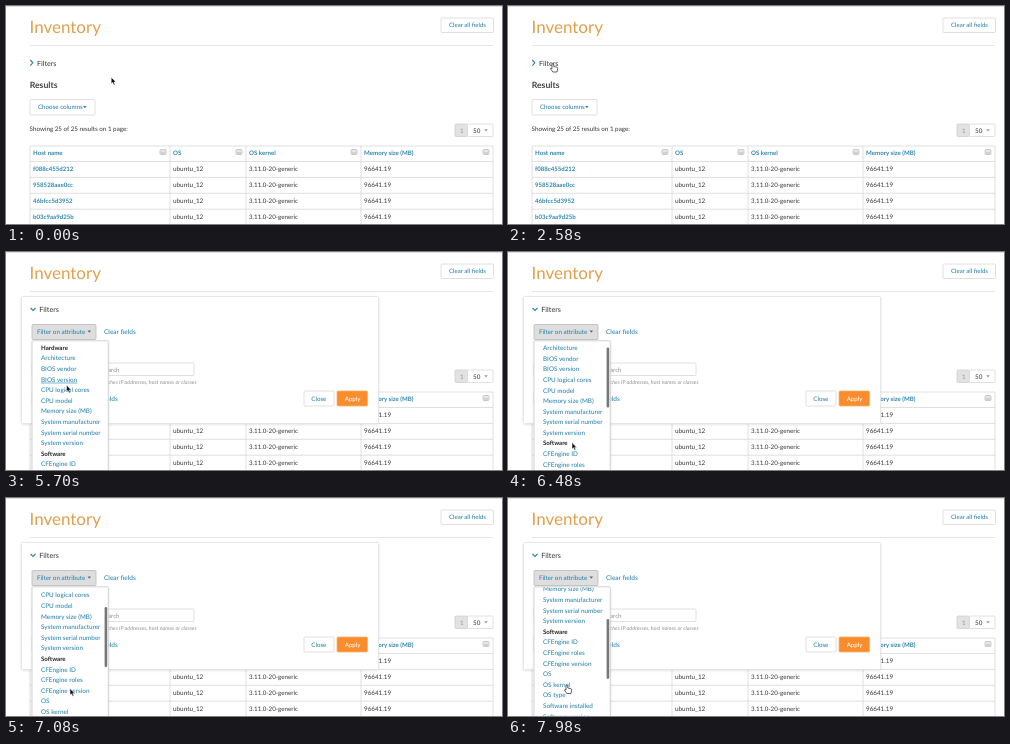
Recreate the animation shown at these times as an HTML page. Size 496 px wide and 218 px high, loop 8 s.

```html
<!DOCTYPE html>
<html lang="en">
<head>
<meta charset="utf-8">
<title>Inventory</title>
<style>
html, body { margin: 0; width: 496px; height: 218px; overflow: hidden; background: #fff; }
svg { display: block; }
text { font-family: Lato, "Open Sans", sans-serif; font-weight: 500; text-rendering: geometricPrecision; }
</style>
</head>
<body>
<svg id="stage" width="496" height="218" viewBox="0 0 496 218"></svg>
<script>
const BLUE = '#2e86ae', DARK = '#444', GREY = '#999', LINE = '#d8d8d8';
const LOOP = 8000, OPEN = 2600, HOVER = 4380, DROP = 4920, SCROLL = 6270;

// y is the middle of the capitals
const text = (x, y, s, fill = DARK, size = 6.2, extra = '') =>
  `<text x="${x}" y="${y + size * .36}" font-size="${size}" fill="${fill}" ${extra}>${s}</text>`;
const bold = (x, y, s, fill = DARK, size = 6.15) => text(x, y, s, fill, size, 'style="font-weight:700"');
const box = (x, y, w, h, fill = '#fff', stroke = LINE, extra = '') =>
  `<rect x="${x}" y="${y}" width="${w}" height="${h}" rx="1" fill="${fill}" stroke="${stroke}" stroke-width=".8" ${extra}/>`;
const line = (d, stroke = LINE, width = .8, extra = '') =>
  `<path d="${d}" fill="none" stroke="${stroke}" stroke-width="${width}" ${extra}/>`;
const caret = (x, y, fill = BLUE) => `<path d="M${x} ${y - 1}h3.6l-1.8 2.2z" fill="${fill}"/>`;

function table() {
  const cols = [[24, 'Host name'], [164, 'OS'], [240, 'OS kernel'], [355, 'Memory size (MB)']];
  const hosts = ['f088c455d212', '958528aae0cc', '46bfcc5d3952', 'b03c9aa9d25b'];
  let s = line('M24 218V140H487V218M164 140V218M240 140V218M355 140V218');
  cols.forEach(([x, name], i) => {
    const end = i < 3 ? cols[i + 1][0] : 487;
    s += bold(x + 3, 147, name, BLUE) + box(end - 10, 143.5, 6, 5, '#e6e6e6', '#c0c0c0')
      + line(`M${end - 9} 147h4`, '#aaa', .7);
  });
  hosts.forEach((host, i) => {
    const y = 162.8 + i * 15.9;
    s += line(`M24 ${155.5 + i * 15.9}H487`) + bold(27, y, host, BLUE, 6.1) + text(167, y, 'ubuntu_12', DARK, 6.35)
      + text(243, y, '3.11.0-20-generic') + text(358, y, '96641.19', DARK, 6.3);
  });
  return s;
}

const page = line('M0 .5H496', '#ddd', 1)
  + text(23.5, 21, 'Inventory', '#e0a04c', 17, 'style="font-weight:400"')
  + line('M24 39.5H487', '#e6e6e6', 1)
  + box(435, 12, 52.5, 14.5) + text(443, 19, 'Clear all fields', BLUE, 6.05)
  + line('M24.3 54l2.5 2.8-2.5 2.8', BLUE, 1.2) + text(31, 57, 'Filters', DARK, 7.1)
  + bold(23.7, 79.3, 'Results', DARK, 8.7)
  + box(24, 93.5, 65, 15.5) + text(32, 101, 'Choose columns', BLUE) + caret(77, 101)
  + text(23.6, 122.3, 'Showing 25 of 25 results on 1 page:', DARK, 6.25)
  + box(449, 118, 12.5, 12.5, '#e2e2e2', '#d0d0d0') + text(454, 124.3, '1', GREY)
  + box(461.5, 118, 25.5, 12.5) + text(467, 124.3, '50', DARK, 6.3) + caret(478.2, 124.3, GREY)
  + table();

const panel = box(15.5, 44.5, 357, 127, '#fff', '#e2e2e2', 'filter="url(#shade)"')
  + line('M24.5 56l2.5 2.5 2.5-2.5', BLUE, 1.2) + text(33.3, 57.2, 'Filters', DARK, 7.2)
  + box(26, 72.5, 64, 15, '#fff', LINE, 'id="attr"')
  + text(31, 79.4, 'Filter on attribute', BLUE, 6.25, 'id="attrText"') + caret(81.5, 79.5, '#666')
  + text(98, 79.5, 'Clear fields', BLUE, 6.5)
  + box(26, 110, 43.5, 15) + text(33.5, 117.3, 'All hosts', BLUE) + caret(57, 117.3)
  + text(78.5, 117.5, 'or', GREY, 5.6)
  + box(92.5, 111, 95.5, 12.5) + text(95.5, 117.5, 'Search', GREY, 6.1)
  + text(93, 130.2, 'matches IP addresses, host names or classes', GREY, 5.35, 'font-style="italic"')
  + box(26, 138.5, 47, 15.5) + text(34, 146.5, 'Show hosts', BLUE, 6.1)
  + text(80, 146.5, 'Clear fields', BLUE, 6.5)
  + box(298, 139, 30, 15) + text(305.3, 146.3, 'Close', BLUE)
  + box(331, 139, 30.5, 15, '#f98c2c', '#fbb06c') + text(338.7, 146.3, 'Apply', '#fff');

const items = ['Hardware', 'Architecture', 'BIOS vendor', 'BIOS version', 'CPU logical cores', 'CPU model',
  'Memory size (MB)', 'System manufacturer', 'System serial number', 'System version', 'Software',
  'CFEngine ID', 'CFEngine roles', 'CFEngine version', 'OS', 'OS kernel', 'OS type',
  'Software installed', 'Software version'];
const heading = s => s === 'Hardware' || s === 'Software';
const itemY = i => 95.6 + i * 10.6;
const list = items.map((s, i) => heading(s)
  ? bold(35, itemY(i), s, '#222')
  : text(35, itemY(i), s, BLUE, 6.35, 'class="item"')).join('');

const stage = document.getElementById('stage');
stage.innerHTML = `<defs>
  <filter id="shade" x="-5%" y="-5%" width="110%" height="115%"><feDropShadow dx="0" dy=".8" stdDeviation="1" flood-opacity=".12"/></filter>
  <clipPath id="panelClip"><rect id="reveal" x="10" y="40" width="370" height="0"/></clipPath>
  <clipPath id="listClip"><rect x="26" y="89.5" width="76" height="130"/></clipPath></defs>
  ${page}
  <g id="panel" clip-path="url(#panelClip)">${panel}</g>
  <g id="drop">${box(26, 88.8, 76.3, 140, '#fff', '#ccc', 'filter="url(#shade)"')}
    <g clip-path="url(#listClip)"><g id="list">${list}</g></g>
    <rect id="thumb" x="98.6" width="2.6" height="60" rx="1.3" fill="#777"/></g>
  <path id="arrow" d="M0 0V6.6L1.5 5.3 2.6 7.8 3.8 7.3 2.7 4.9H4.7Z" fill="#111" stroke="#fff" stroke-width=".5"/>
  <path id="hand" d="M-1 0Q0-1 .8 0V2.5L4 3.2Q4.8 3.5 4.7 4.5L4 8H-.2L-2.6 4.6Q-2.5 3.6-1 4.5Z" fill="#fff" stroke="#333" stroke-width=".75"/>`;

const $ = id => document.getElementById(id);
const show = (id, on) => $(id).setAttribute('display', on ? 'inline' : 'none');
const links = [...document.querySelectorAll('.item')];
const hovered = links.find(e => e.textContent === 'BIOS version');

// keys: [time, ...values]
function at(keys, t) {
  const n = keys.findIndex(k => k[0] > t);
  if (n === 0) return keys[0].slice(1);
  if (n < 0) return keys[keys.length - 1].slice(1);
  const a = keys[n - 1], b = keys[n], p = (t - a[0]) / (b[0] - a[0]);
  return a.slice(1).map((v, i) => v + (b[i + 1] - v) * p);
}
const pointer = [[0, 105, 71], [600, 235, 150], [780, 235, 150], [1140, 250, 171], [1260, 250, 171],
  [1600, 140, 108], [1980, 45, 58], [3540, 45, 58], [4200, 70, 81], [5400, 70, 81], [5700, 60.5, 133],
  [6240, 64, 190.5], [7860, 64, 190.5], [7980, 59, 187.5]];
const scroll = [[SCROLL, 0], [6840, 28], [7380, 57], [7920, 68]];

function draw(t) {
  const open = Math.min(1, Math.max(0, (t - OPEN) / 340));
  show('panel', open > 0);
  $('reveal').setAttribute('height', 24 + 112 * (1 - (1 - open) ** 2));

  const dropped = t >= DROP, over = t >= HOVER && !dropped;
  $('attr').setAttribute('fill', dropped ? '#dedede' : '#fff');
  $('attr').setAttribute('stroke', over ? '#999' : dropped ? '#bbb' : LINE);
  $('attrText').setAttribute('fill', over ? DARK : BLUE);

  const [shift] = at(scroll, t);
  show('drop', dropped);
  show('thumb', t >= SCROLL);
  $('list').setAttribute('transform', `translate(0 ${-shift})`);
  $('thumb').setAttribute('y', 91 + shift * .44);
  hovered.setAttribute('text-decoration', t >= 5640 && t < 5760 ? 'underline' : 'none');

  const [x, y] = at(pointer, t);
  const hand = t >= 1920 && t < 5460 || t >= 7920;
  show('hand', hand);
  show('arrow', !hand);
  $(hand ? 'hand' : 'arrow').setAttribute('transform', `translate(${x} ${y})`);
}

const start = performance.now();
function tick() {
  draw((performance.now() - start) % LOOP);
  requestAnimationFrame(tick);
}
tick();
</script>
</body>
</html>
```
